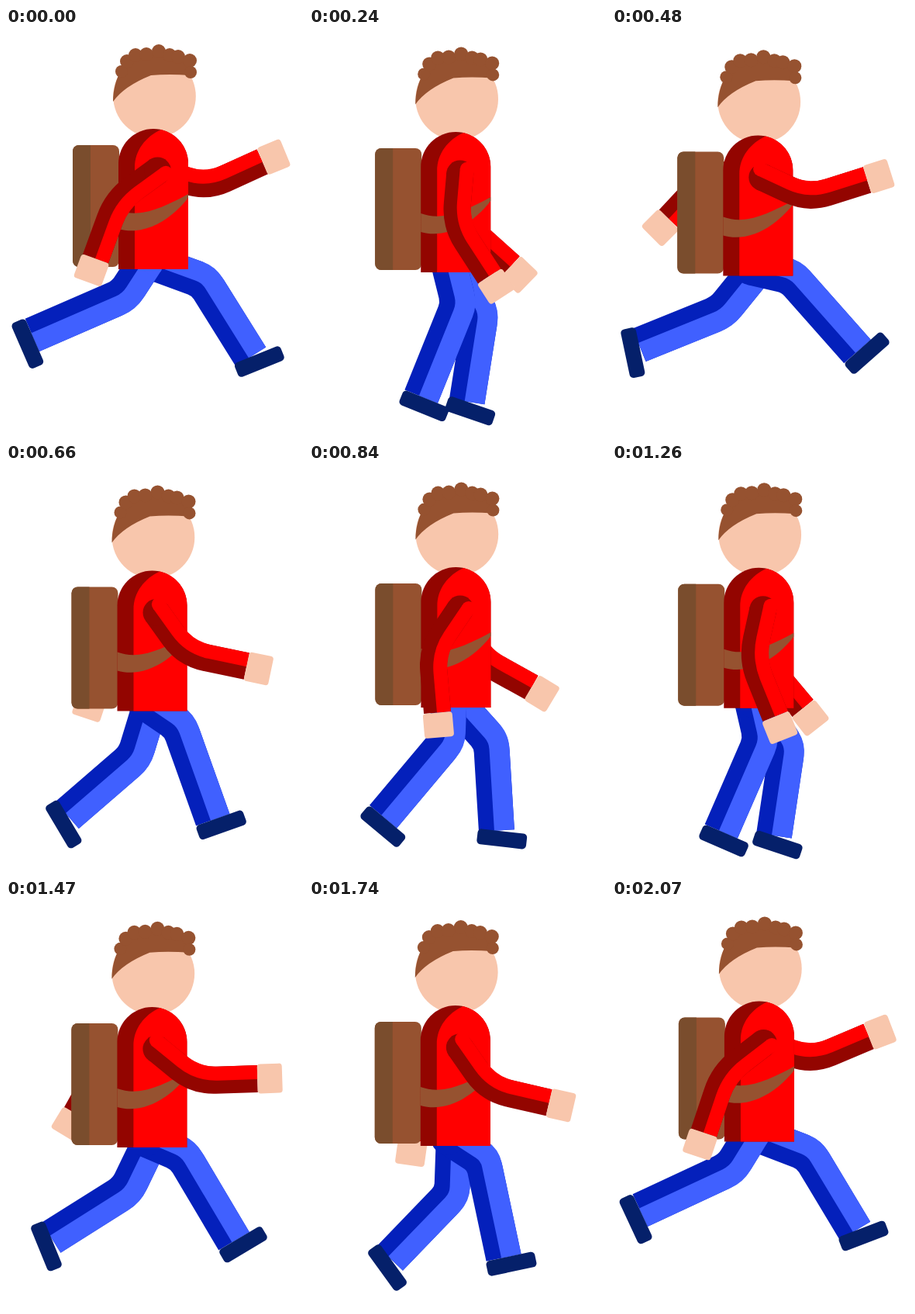
An HTML page that plays this animation: 383 by 526 pixels, repeating every 2.1 s.

```html
<!DOCTYPE html>
<html lang="en">
<head>
<meta charset="utf-8">
<title>Walk cycle</title>
<style>
  html, body { margin: 0; width: 100%; height: 100%; overflow: hidden; background: #fff; }
  svg { display: block; width: 100vw; height: 100vh; }
</style>
</head>
<body>
<svg viewBox="0 0 383 526">
  <g id="body">
    <g id="farArm"></g>
    <g id="head">
      <circle cx="191.5" cy="88" r="53.3" fill="#f8c6ac"/>
      <g id="hair" fill="#965230">
        <path d="M138 95C138 80 142 65 148 56L156 42 197 28 238 42 237 61Q210 59 187 61Q152 75 138 95Z"/>
      </g>
    </g>
    <g id="farLeg"></g>
    <rect x="86" y="151" width="60" height="157" rx="8" fill="#965230"/>
    <path d="M109 151H94a8 8 0 0 0-8 8V300a8 8 0 0 0 8 8H109Z" fill="#7a4d2d"/>
    <g id="nearLeg"></g>
    <path d="M145 311V175A45 45 0 0 1 235 175V311Z" fill="#930500"/>
    <path d="M166 311V180C166 158 180 140 200 131A45 45 0 0 1 235 175V311Z" fill="#f00"/>
    <path d="M145 235C170 244 195 236 235 214V219C215 245 180 269 145 259Z" fill="#965230"/>
    <g id="nearArm"></g>
  </g>
</svg>
<script>
const LOOP = 2100, STEP = 30;
const $ = id => document.getElementById(id);

function add(parent, tag, attrs) {
  const el = document.createElementNS('http://www.w3.org/2000/svg', tag);
  for (const name in attrs) el.setAttribute(name, attrs[name]);
  return parent.appendChild(el);
}

// Curls: x, y, radius
[[149, 56, 8], [156, 43, 9], [167, 35, 9], [181, 34, 9], [197, 30, 9],
 [211, 35, 9], [222, 37, 9], [237, 42, 9], [238, 57, 8]]
  .forEach(([cx, cy, r]) => add($('hair'), 'circle', { cx, cy, r }));

const ARM = { width: 35, shade: 17, bend: 26, lead: 7, dark: '#930500', light: '#f00' };
const LEG = { width: 46, shade: 20, bend: 13, lead: 0, dark: '#0420bb', light: '#4060ff' };
const HAND = { x: -19, y: 0, width: 38, height: 32, rx: 4, fill: '#f8c6ac' };
const SHOE = { x: -24, y: 0, width: 64, height: 20, rx: 5, fill: '#05206a' };

// Direction for an angle measured from straight down, positive to the right
const along = a => [Math.sin(a), Math.cos(a)];
const move = (p, d, n) => [p[0] + d[0] * n, p[1] + d[1] * n];
const mid = (p, q) => [(p[0] + q[0]) / 2, (p[1] + q[1]) / 2];

function makeBand(group, color, width) {
  const path = add(group, 'path', { fill: 'none', stroke: color, 'stroke-width': width, 'stroke-linejoin': 'round' });
  const cap = add(group, 'circle', { r: width / 2, fill: color });
  return (start, joint, end, d1, d2, bend) => {
    path.setAttribute('d',
      `M${start}L${move(joint, d1, -bend)}Q${joint} ${move(joint, d2, bend)}L${end}`);
    cap.setAttribute('cx', start[0]);
    cap.setAttribute('cy', start[1]);
  };
}

function makeLimb(id, style, root, upper, lower, tip, tipTurn = 0) {
  const group = $(id), { width, shade, bend, lead } = style;
  const dark = makeBand(group, style.dark, width);
  const light = makeBand(group, style.light, width - shade);
  const end = add(group, 'rect', tip);
  const shift = shade / 2;
  return (deg1, deg2) => {
    const a1 = deg1 * Math.PI / 180, a2 = deg2 * Math.PI / 180;
    const d1 = along(a1), d2 = along(a2);
    const joint = move(root, d1, upper), last = move(joint, d2, lower);
    dark(root, joint, last, d1, d2, bend);

    const front = a => [Math.cos(a), -Math.sin(a)];
    const miter = shift / Math.cos((a1 - a2) / 2);
    light(move(move(root, front(a1), shift), d1, -lead),
      move(joint, front((a1 + a2) / 2), miter),
      move(last, front(a2), shift), d1, d2, bend);
    end.setAttribute('transform', `translate(${last}) rotate(${tipTurn - deg2})`);
  };
}

const limbs = [
  makeLimb('nearArm', ARM, [195.5, 184], 65, 80, HAND),
  makeLimb('farArm', ARM, [195.5, 184], 66, 80, HAND, 2),
  makeLimb('nearLeg', LEG, [181, 300], 53, 129, SHOE),
  makeLimb('farLeg', LEG, [188, 302], 71, 115, SHOE, 10)
];

// Time, drop of the body, then upper and lower angles: near arm, far arm, near leg, far leg
const KEYS = [
  [0,    0,   -54, -20,   71, 114.5, -33, -66.5,  70, 32],
  [240,  4,   -5, 33,     5, 48,     14, -22,     29, -9],
  [480,  8.5, 65, 107.5,  -94, -43,  77, 41.5,    -39, -68],
  [540,  9.2, 67, 110,    -96, -45,  79, 44,      -41, -70],
  [840,  3,   -34, 5,     19.5, 61,  -2, -40,     42, 3.5],
  [1050, 0,   -54, -20,   71, 114,   -33, -68,    70, 32],
  [1260, 3.7, -12.5, 22,  0, 40,     13, -23.5,   33, -8.5],
  [1575, 9,   66, 109,    -95, -44,  79, 43,      -40, -69],
  [1740, 6,   35, 77,     -52, -6,   57, 12,      -2, -44],
  [2070, 0.5, -52.5, -18.5, 70, 113, -31.5, -65,  69, 31]
];

function key(i) {
  const n = KEYS.length, turn = Math.floor(i / n), k = KEYS[i - turn * n];
  return [k[0] + turn * LOOP, ...k.slice(1)];
}

const slope = (p, q, c) => (q[c] - p[c]) / (q[0] - p[0]);
function tangent(p, q, r, c) {
  const a = slope(p, q, c), b = slope(q, r, c);
  return a * b > 0 ? 2 * a * b / (a + b) : 0;
}

// Smooth interpolation that never overshoots a key
function pose(t) {
  let i = KEYS.length - 1;
  while (KEYS[i][0] > t) i--;
  const [p, q, r, s] = [i - 1, i, i + 1, i + 2].map(key);
  const span = r[0] - q[0], u = (t - q[0]) / span, v = 1 - u;
  return q.slice(1).map((_, j) => {
    const c = j + 1;
    return q[c] * v * v * (1 + 2 * u) + r[c] * u * u * (1 + 2 * v)
      + span * u * v * (v * tangent(p, q, r, c) - u * tangent(q, r, s, c));
  });
}

function draw(time) {
  const [drop, ...angles] = pose(Math.floor(time % LOOP / STEP) * STEP);
  $('body').setAttribute('transform', `translate(${-0.2 * drop} ${drop})`);
  $('head').setAttribute('transform', `translate(0 ${-0.15 * drop})`);
  limbs.forEach((limb, i) => limb(angles[2 * i], angles[2 * i + 1]));
}

const begin = performance.now();
function tick() {
  draw(performance.now() - begin);
  requestAnimationFrame(tick);
}
tick();
</script>
</body>
</html>
```
